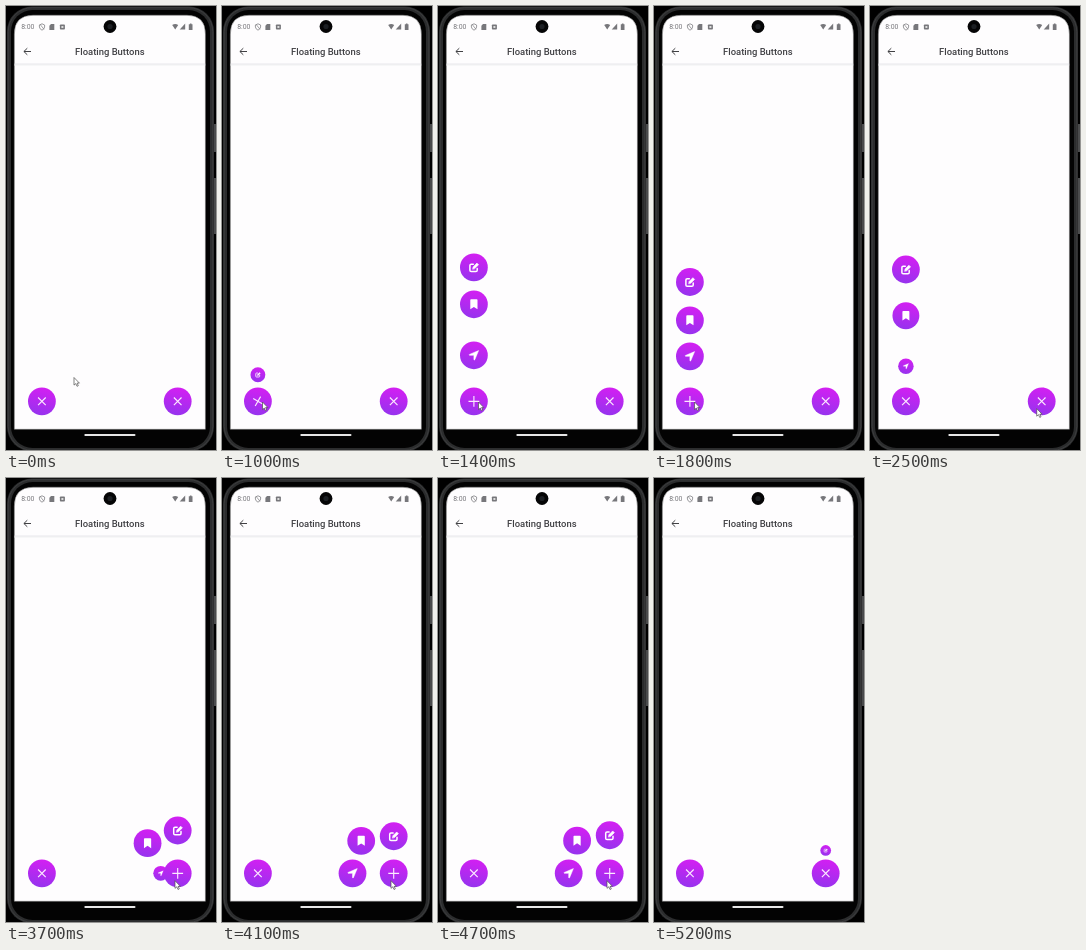
Write an HTML page that moves like this. It is 210 by 444 pixels and loops after 5.3 s.

```html
<!DOCTYPE html>
<html lang="en">
<head>
<meta charset="utf-8">
<title>Floating Buttons</title>
<style>
  html, body { margin: 0; width: 100%; height: 100%; overflow: hidden; background: #000; }
  svg { display: block; width: 210px; height: 444px; }
  text { font-family: Roboto, sans-serif; }
</style>
</head>
<body>
<svg viewBox="0 0 210 444">
  <defs>
    <linearGradient id="purple" x1=".6" y1="0" x2=".4" y2="1">
      <stop offset="0" stop-color="#d41ff2"/>
      <stop offset="1" stop-color="#9633ee"/>
    </linearGradient>
    <circle id="disc" r="13.9" fill="url(#purple)"/>
    <g id="edit" fill="none" stroke="#fff" stroke-width="1.5" stroke-linejoin="round" stroke-linecap="round">
      <path d="M-.6-3.2H-2.7Q-4-3.2-4-1.9V2.9Q-4 4.2-2.7 4.2H2Q3.3 4.2 3.3 2.9V1"/>
      <path d="M-1.2 1.5L-.8-.5L3-4.3L4.7-2.6L.8 1.2Z" fill="#fff" stroke-width=".6"/>
    </g>
    <path id="bookmark" d="M-3.6-4.2Q-3.6-5-2.8-5H2.8Q3.6-5 3.6-4.2V5L0 2.6L-3.6 5Z" fill="#fff"/>
    <path id="send" d="M4.7-4.7L.9 4.4Q.5 5.1 0 4.4V0H-4.4Q-5.1-.5-4.4-.9Z" fill="#fff" stroke="#fff" stroke-width=".5" stroke-linejoin="round"/>
  </defs>

  <!-- phone body -->
  <rect width="210" height="444" fill="#000"/>
  <path d="M207.5 118h2.5v28h-2.5zM207.5 172h2.5v56h-2.5z" fill="#4a4b4c"/>
  <rect x="1" y=".5" width="207" height="445" rx="25" fill="#2b2c2d"/>
  <rect x="2.2" y="1.7" width="204.6" height="442.6" rx="24" fill="none" stroke="#3c3d3e"/>
  <rect x="5" y="4" width="199" height="438" rx="21.5" fill="#030303"/>
  <path d="M8.3 423.3V28Q8.3 9.2 27 9.2H181Q199.4 9.2 199.4 28V423.3Z" fill="#fefdfe" stroke="#777" stroke-width=".5"/>
  <rect x="78.3" y="428" width="51.2" height="2.1" rx="1" fill="#e6e6e6"/>

  <!-- status bar -->
  <circle cx="104" cy="20.5" r="6.4" fill="#050506"/>
  <circle cx="104" cy="20.5" r="2.6" fill="#1c1f23"/>
  <g fill="#77777b">
    <text x="15.2" y="23.4" font-size="6.9">8:00</text>
    <path d="M36 17.8L38.6 19V21Q38.4 23 36 24.2Q33.6 23 33.4 21V19Z" fill="none" stroke="#808084" stroke-width=".8"/>
    <path d="M34 18.3L38 23.3" stroke="#808084" stroke-width=".7"/>
    <path d="M45 18H48.3V24H43.4V19.7Z"/>
    <rect x="53.9" y="18.5" width="5" height="5" rx=".8"/>
    <rect x="55.4" y="20" width="2" height="2" fill="#ddd"/>
    <path d="M166.2 19Q169.2 16.8 172.2 19L169.2 23.4Z"/>
    <path d="M179.2 17.6V23.6H173.7Z"/>
    <path d="M182.8 18.2H183.9V17.4H185.5V18.2H186.5V24H182.8Z"/>
  </g>

  <!-- app bar -->
  <path d="M25 45.5H17.9M21.3 42.2L17.9 45.5L21.3 48.8" fill="none" stroke="#414144"/>
  <text x="103.8" y="48.9" font-size="9.45" font-weight="500" text-anchor="middle" fill="#414145">Floating Buttons</text>
  <rect x="8.5" y="57.6" width="190.7" height="1" fill="#e2e2e5"/>
  <rect x="8.5" y="58.6" width="190.7" height="1" fill="#f3f3f5"/>

  <g id="stage"></g>
  <path id="cursor" d="M0 0V7.6L1.8 6.1L3 8.8L4.3 8.2L3.1 5.6H5.4Z" fill="#fff" stroke="#505050" stroke-width=".7" stroke-linejoin="round"/>
</svg>
<script>
const LOOP = 5300, STEP = 100, BASE_Y = 395.3;
const stage = document.getElementById('stage');
const cursor = document.getElementById('cursor');

const clamp = v => Math.min(1, Math.max(0, v));
const smooth = p => p * p * (3 - 2 * p);
const backIn = p => p * p * (2.7 * p - 1.7);

// Damped swing from 0 that settles on 1.
function spring(ms, damping) {
  const s = Math.max(0, ms) / 1000;
  return 1 - Math.exp(-damping * s) * Math.cos(2 * Math.PI * s / .76);
}

// delay and damping shape the opening; closing is how long the retreat takes.
const items = {
  send: { delay: 260, damping: 12, closing: 280 },
  bookmark: { delay: 130, damping: 4.8, closing: 360 },
  edit: { delay: 60, damping: 4.8, closing: 435 }
};

const menus = [
  { x: 35.9, open: 900, close: 2285, reach: { send: [0, -45], bookmark: [0, -83], edit: [0, -121] } },
  { x: 171.7, open: 3400, close: 4835, reach: { send: [-41, 0], bookmark: [-32.5, -32.5], edit: [0, -38] } }
];

const pointerStart = [68, 371.5];
const pointerMoves = [
  { from: 0, to: 150, x: 73, y: 374 },
  { from: 150, to: 600, x: 34, y: 398 },
  { from: 600, to: 700, x: 40.5, y: 396 },
  { from: 2150, to: 2530, x: 169, y: 402.7 }
];
const POINTER_GONE = 5100;

function pointerAt(t) {
  let [x, y] = pointerStart;
  for (const move of pointerMoves) {
    const k = smooth(clamp((t - move.from) / (move.to - move.from)));
    x += (move.x - x) * k;
    y += (move.y - y) * k;
  }
  return [x, y];
}

// Share of the full travel, and scale, of one item.
function itemPose(item, menu, t) {
  if (t < menu.close) {
    const since = t - menu.open - item.delay;
    return [spring(since, item.damping), clamp(since / 75)];
  }
  const p = clamp((t - menu.close) / item.closing);
  return [1 - backIn(p), clamp(2.4 * (1 - p))];
}

function add(parent, tag, attrs) {
  const node = document.createElementNS('http://www.w3.org/2000/svg', tag);
  for (const key in attrs) node.setAttribute(key, attrs[key]);
  return parent.appendChild(node);
}

for (const menu of menus) {
  menu.nodes = {};
  for (const name in items) {
    const node = menu.nodes[name] = add(stage, 'g');
    add(node, 'use', { href: '#disc' });
    add(node, 'use', { href: '#' + name });
  }
  const main = add(stage, 'g', { transform: `translate(${menu.x} ${BASE_Y})` });
  add(main, 'use', { href: '#disc' });
  menu.cross = add(main, 'path', { d: 'M-5.4 0H5.4M0-5.4V5.4', stroke: '#fbeaff', 'stroke-width': 1.15 });
}

function render(t) {
  for (const menu of menus) {
    for (const name in items) {
      const [share, scale] = itemPose(items[name], menu, t);
      const [dx, dy] = menu.reach[name];
      const node = menu.nodes[name];
      node.setAttribute('transform',
        `translate(${menu.x + dx * share} ${BASE_Y + dy * share}) scale(${scale})`);
      node.setAttribute('visibility', scale > 0 ? 'visible' : 'hidden');
    }
    const turn = 1 - clamp((t - menu.open) / 300) + clamp((t - menu.close) / 150);
    menu.cross.setAttribute('transform', `rotate(${45 * turn})`);
  }
  const [x, y] = pointerAt(t);
  cursor.setAttribute('transform', `translate(${x} ${y})`);
  cursor.setAttribute('visibility', t < POINTER_GONE ? 'visible' : 'hidden');
}

const start = performance.now();
function tick() {
  const t = (performance.now() - start) % LOOP;
  render(Math.floor(t / STEP) * STEP);
  requestAnimationFrame(tick);
}
tick();
</script>
</body>
</html>
```
